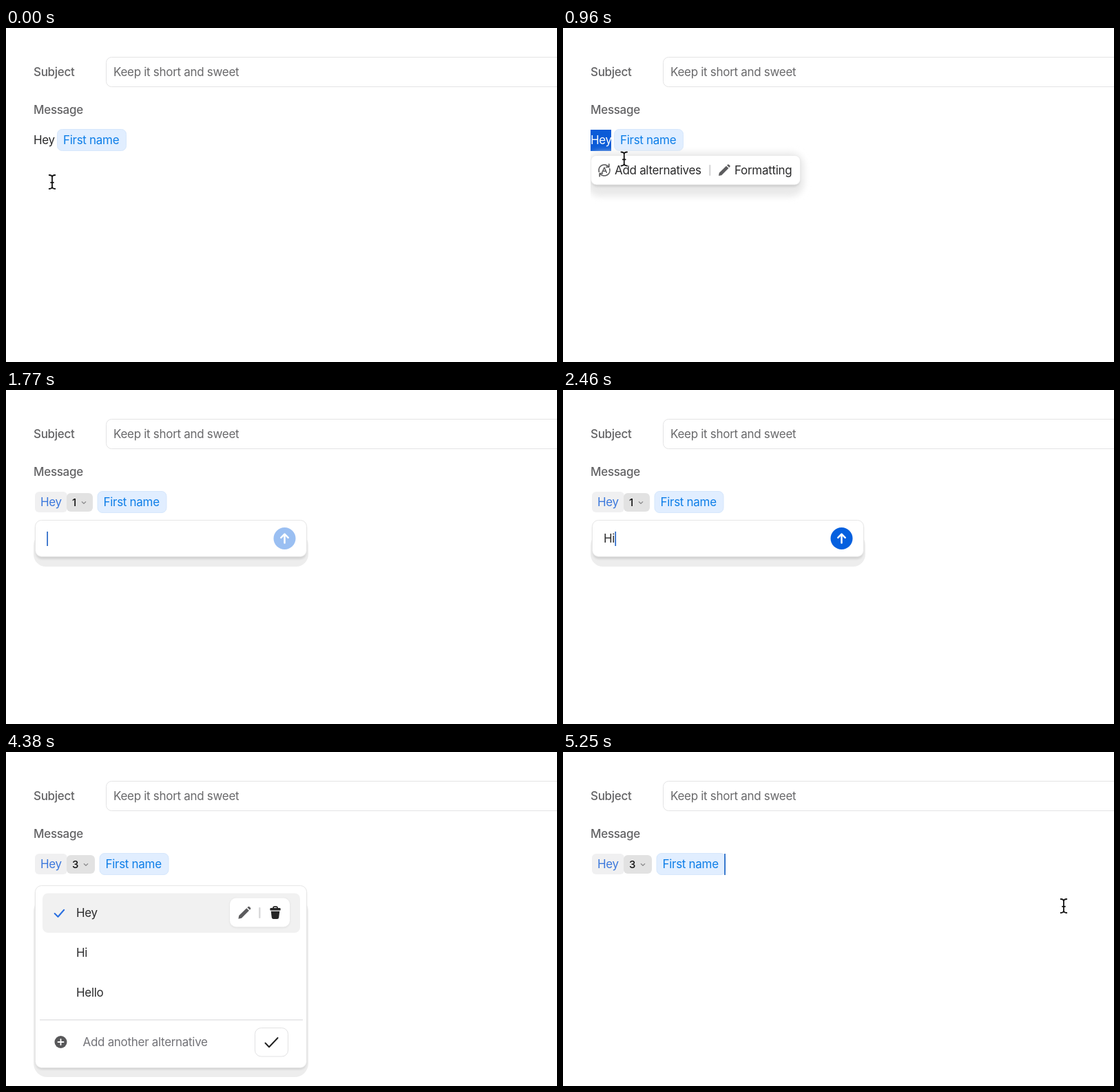
Recreate the animation shown at these times as an HTML page. Size 800x486 px, loop 5280 ms.

```html
<!DOCTYPE html>
<html lang="en">
<head>
<meta charset="utf-8">
<title>Add alternatives</title>
<style>
  html, body { margin: 0; width: 100%; height: 100%; overflow: hidden; background: #fff; }
  svg { display: block; width: 100%; height: 100%; }
  text { font: 400 17px Inter, sans-serif; letter-spacing: -0.3px; fill: #2a2a2b; white-space: pre; }
  .label { font-weight: 500; fill: #636365; }
  .muted { fill: #69696b; }
  .hint { fill: #737378; }
  .line { fill: none; stroke-linecap: round; stroke-linejoin: round; }
</style>
</head>
<body>
<svg viewBox="0 0 800 486" xmlns="http://www.w3.org/2000/svg">
  <defs>
    <filter id="soft" x="-20%" y="-40%" width="140%" height="180%"><feGaussianBlur stdDeviation="5"/></filter>
    <filter id="near" x="-10%" y="-20%" width="120%" height="140%"><feGaussianBlur stdDeviation="1.6"/></filter>
    <clipPath id="edge"><rect x="40" y="0" width="400" height="486"/></clipPath>
    <g id="pencil">
      <path d="M-8 8l.8-4.3L3-6.3l3.4 3.4L-3.7 7.2z"/>
      <path d="M4-7.2l1-1q1-.8 2 0l1.3 1.4q.8 1 0 1.9l-1 1z"/>
    </g>
    <g id="trash">
      <path class="line" d="M-3-6.8q0-2 1.6-2h2.8q1.6 0 1.6 2" stroke="#262626" stroke-width="1.8"/>
      <rect x="-7.6" y="-7" width="15.2" height="3.6" rx="1.2"/>
      <path d="M-6.3-2.3H6.3L5.2 6.8Q4.9 9 2.8 9h-5.6Q-4.9 9-5.2 6.8z"/>
    </g>
    <g id="swap" class="line" stroke="#5c5c5e" stroke-width="1.7">
      <path d="M-7.7 2.2A8 8 0 0 1 5.9-5.4M7.7-2.2A8 8 0 0 1-5.9 5.4"/>
      <path d="M6.8-8.8v4.1H2.7M-6.8 8.8V4.7h4.1"/>
      <path d="M-3.3 3.4L0-4l3.3 7.4M-2.2 1.2h4.4" stroke-width="1.5"/>
    </g>
    <path id="beam" class="line" d="M-4.3-10Q0-10 0-6.8V6.8Q0 10-4.3 10M4.3-10Q0-10 0-6.8M0 6.8Q0 10 4.3 10M-2 .8h4"/>
  </defs>

  <rect width="800" height="486" fill="#fff"/>
  <text class="label" x="40" y="70">Subject</text>
  <rect x="145.5" y="42.5" width="700" height="43" rx="8" fill="#fff" stroke="#e3e3e4"/>
  <text class="muted" x="156" y="70">Keep it short and sweet</text>
  <text class="label" x="40" y="124.500">Message</text>

  <g id="plain">
    <rect id="select" x="40" y="148" width="30" height="31" fill="#0b5bd7"/>
    <text id="hey" x="40" y="169">Hey</text>
  </g>
  <g id="marked">
    <rect x="42" y="148" width="47" height="30" rx="6" fill="#f0f0f1"/>
    <text x="50" y="169" style="fill:#3b78dc">Hey</text>
    <rect id="badge" x="88" y="150" width="38" height="27" rx="6" fill="#e2e2e2"/>
    <text id="count" x="96" y="169" style="font-size:15px;font-weight:500;fill:#111"></text>
    <path id="chevron" class="line" d="M-2.700-1.300L0 1.300L2.700-1.300" stroke="#8d8d8f" stroke-width="1.200"/>
  </g>
  <g id="name">
    <rect x=".5" y="147.500" width="100" height="31" rx="7" fill="#e1eeff" stroke="#d6e7fc"/>
    <text x="9" y="169" style="fill:#0d7ee8">First name</text>
  </g>
  <rect id="endCaret" x="234.200" y="148" width="1.700" height="31" fill="#1f67c6"/>

  <g id="menu" clip-path="url(#edge)">
    <rect x="34" y="181" width="316" height="64" rx="20" fill="#e9e9e9" filter="url(#soft)"/>
    <rect x="41" y="187" width="303" height="44" rx="9" fill="#cfcfcf" filter="url(#near)"/>
    <rect x="40.500" y="185.500" width="304" height="42.500" rx="8" fill="#fff" stroke="#e6e6e6" stroke-width=".6"/>
    <rect id="hover" x="46" y="191" width="162" height="32" rx="7" fill="#f2f2f3"/>
    <use href="#swap" x="60" y="207"/>
    <text x="75" y="213">Add alternatives</text>
    <rect x="212" y="199" width="2.500" height="16" rx="1" fill="#dadadb"/>
    <use href="#pencil" x="234" y="207" fill="#5c5c5e"/>
    <text x="249" y="213">Formatting</text>
  </g>

  <g id="entry">
    <rect x="40" y="208" width="399" height="49" rx="18" fill="#ededed"/>
    <rect x="43" y="193" width="393" height="53" rx="9" fill="#d2d2d2" filter="url(#near)"/>
    <rect x="42.500" y="189.500" width="394" height="53" rx="9" fill="#fff" stroke="#e6e6e6"/>
    <text id="entryText" x="59" y="222"></text>
    <rect id="entryCaret" y="206" width="1.600" height="21" fill="#1c5fc4"/>
    <g id="send">
      <circle cx="404.500" cy="216" r="16" fill="#0560df"/>
      <path class="line" d="M404.500 222.500v-12.500M399.300 214.800l5.200-5.200 5.200 5.200" stroke="#fff" stroke-width="2.500"/>
    </g>
  </g>

  <g id="list">
    <rect class="grow" data-h="203" x="40" y="212" width="399" rx="20" fill="#ededed"/>
    <rect class="grow" data-h="206" x="43" y="198" width="393" rx="9" fill="#d2d2d2" filter="url(#near)"/>
    <rect class="grow" data-h="207" x="42.500" y="194.500" width="394" rx="9" fill="#fff" stroke="#e6e6e6"/>
    <rect x="53" y="205.500" width="374" height="57.500" rx="8" fill="#f1f1f1"/>
    <path class="line" d="M70.700 235l4.800 4.800 8.700-10" stroke="#2b70e0" stroke-width="2.100"/>
    <text x="102" y="240">Hey</text>
    <rect x="325" y="213" width="87" height="42.500" rx="9" fill="#dcdcdc" filter="url(#near)"/>
    <rect x="325" y="212.500" width="87" height="42" rx="9" fill="#fff"/>
    <use href="#pencil" transform="translate(346 234) scale(1.080)" fill="#5c5c5e"/>
    <rect x="367" y="226" width="2.500" height="16" rx="1" fill="#dadadb"/>
    <use href="#trash" x="391" y="234" fill="#262626"/>
    <text x="102" y="298">Hi</text>
    <text id="third" x="102" y="356">Hello</text>
    <g id="footer">
      <rect x="49" y="331" width="382" height="1.500" fill="#e4e4e5"/>
      <circle cx="79.500" cy="364" r="9" fill="#58585a"/>
      <path class="line" d="M75.500 364h8M79.500 360v8" stroke="#fff" stroke-width="1.800"/>
      <text id="fieldText" x="111.500" y="370"></text>
      <rect id="fieldCaret" y="354" width="1.600" height="21" fill="#1c5fc4"/>
      <rect x="361.500" y="343.500" width="48" height="41.500" rx="9" fill="#fff" stroke="#e2e2e3"/>
      <path class="line" d="M376.500 365.500l5.500 5.800 12.500-13.300" stroke="#222" stroke-width="2"/>
    </g>
  </g>

  <g id="cursor">
    <use href="#beam" stroke="#fff" stroke-width="3.600"/>
    <use href="#beam" stroke="#111" stroke-width="1.800"/>
  </g>
</svg>
<script>
  const LOOP = 5280;
  const el = {};
  document.querySelectorAll('svg [id]').forEach(n => el[n.id] = n);
  const growing = [...document.querySelectorAll('.grow')];

  const T = { select: 540, menu: 660, deselect: 1380, mark: 1530, send: 2280,
              second: 2760, third: 4110, close: 4950, caret: 5130 };

  // Cursor stops: time, x, y
  const stops = [
    [0, 67, 224], [450, 62.5, 164], [770, 62.5, 164], [1150, 115, 217],
    [4590, 115, 217], [5010, 741, 224], [5100, 741, 224], [5235, 727, 224], [LOOP, 727, 224]
  ];

  const clamp = v => Math.min(1, Math.max(0, v));
  const ramp = (t, from, to) => clamp((t - from) / (to - from));
  const ease = p => p * p * (3 - 2 * p);
  const mix = (a, b, p) => a + (b - a) * p;
  const alpha = (n, v) => n.setAttribute('opacity', v);
  const show = (n, on) => { n.style.display = on ? '' : 'none'; };
  const move = (n, x, y) => n.setAttribute('transform', `translate(${x} ${y})`);
  const fade = (t, from, to) => ramp(t, from, from + 90) * (1 - ramp(t, to, to + 60));
  const write = (n, s) => { if (n.textContent !== s) n.textContent = s; };
  const typed = (word, t, start, step) =>
    word.slice(0, Math.max(0, Math.floor((t - start) / step) + 1));

  function place(t) {
    let i = 0;
    while (i < stops.length - 2 && t >= stops[i + 1][0]) i++;
    const [a, x, y] = stops[i], [b, u, v] = stops[i + 1];
    const p = ease(ramp(t, a, b));
    return [mix(x, u, p), mix(y, v, p)];
  }

  function setCaret(caret, text, x) {
    const w = text.textContent ? text.getComputedTextLength() : 0;
    caret.setAttribute('x', x + w + 0.3);
  }

  function render(t) {
    const marked = t >= T.mark;
    const count = t >= T.third ? 3 : t >= T.second ? 2 : 1;
    const [cx, cy] = place(t);

    // Message line
    const picked = t >= T.select && t < T.deselect;
    show(el.plain, !marked);
    show(el.marked, marked);
    show(el.select, picked);
    el.hey.style.fill = picked ? '#fff' : '';
    write(el.count, String(count));
    el.badge.setAttribute('width', count > 1 ? 41 : 38);
    move(el.chevron, count > 1 ? 116 : 113, 164);
    move(el.name, !marked ? 74 : count > 1 ? 135.5 : 132.5, 0);
    show(el.endCaret, t >= T.caret);

    // Selection menu
    const menu = fade(t, T.menu, T.mark - 30);
    show(el.menu, menu > 0);
    alpha(el.menu, menu);
    show(el.hover, cx > 46 && cx < 208 && cy > 193);

    // First alternative
    const entry = fade(t, T.mark, T.second - 30);
    show(el.entry, entry > 0);
    alpha(el.entry, entry);
    write(el.entryText, typed('Hi', t, T.send, 170));
    setCaret(el.entryCaret, el.entryText, 59);
    alpha(el.send, t < T.send ? 0.4 : 1);

    // List of alternatives
    const list = fade(t, T.second, T.close);
    const grow = 58 * ease(ramp(t, T.third - 30, T.third + 150));
    show(el.list, list > 0);
    alpha(el.list, list);
    growing.forEach(n => n.setAttribute('height', +n.dataset.h + grow));
    move(el.footer, 0, grow);
    alpha(el.third, ramp(t, T.third, T.third + 120));
    const word = t < T.third ? typed('Hello', t, 3510, 90) : '';
    write(el.fieldText, word || 'Add another alternative');
    el.fieldText.setAttribute('class', word ? '' : 'hint');
    show(el.fieldCaret, word);
    if (word) setCaret(el.fieldCaret, el.fieldText, 111.5);

    show(el.cursor, t < 1680 || t >= 4590);
    move(el.cursor, cx, cy);
  }

  let begin;
  function tick(now) {
    if (begin === undefined) begin = now;
    render((now - begin) % LOOP);
    requestAnimationFrame(tick);
  }
  render(0);
  requestAnimationFrame(tick);
</script>
</body>
</html>
```
